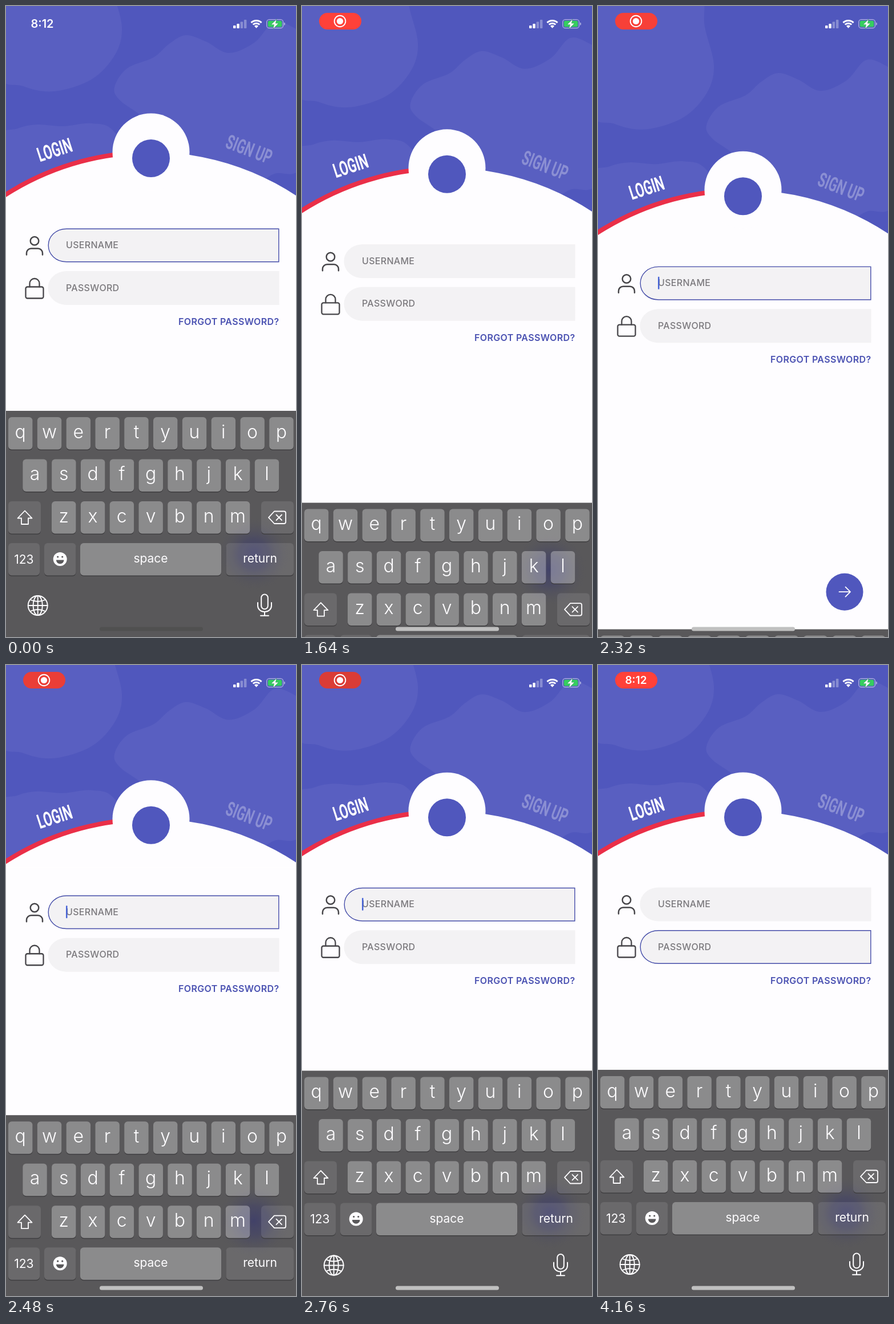
Write an HTML page with a canvas that moves like this. It is 508 px wide and 1102 px high and loops after 4.2 s.

```html
<!DOCTYPE html>
<html lang="en">
<head>
<meta charset="utf-8">
<title>Login screen</title>
<style>
  html, body { margin: 0; width: 100%; height: 100%; overflow: hidden; background: #fefdff; }
  canvas { display: block; width: 100vw; height: 100vh; }
</style>
</head>
<body>
<canvas id="stage"></canvas>
<script>
const W = 508, H = 1102, LOOP = 4200, TICK = 40;
const BLUE = '#5057bd', BLOB = '#595fc1', RED = '#ea2f48', WHITE = '#fefdff', INK = '#47464a';
const KEY_BG = '#59585a', KEY_SHADOW = '#3f3e40';
const FONT = 'Inter, "Open Sans", sans-serif';
const KEYBOARD = { top: 707, height: 395 };
const KEY_H = 56.5;
const CONTENT_SHIFT = 68.5;
const HIDE_AT = 1565, SHOW_AT = 2303;
const HILL = { x: 254, y: 717, r: 462 };
const STRIPE = { x: 254, y: 730.5, r: 475 };
const NARROW = 0.62;

// Moments when focus changes: field 0 is the user name, 1 the password
const FOCUS = [
  { at: -800, field: 0 },
  { at: 600, field: 1 },
  { at: HIDE_AT, field: -1 },
  { at: SHOW_AT, field: 0 },
  { at: 3500, field: 1 }
];

const canvas = document.getElementById('stage');
const ctx = canvas.getContext('2d');
const ratio = window.devicePixelRatio || 1;
canvas.width = W * ratio;
canvas.height = H * ratio;

const clamp = v => Math.max(0, Math.min(1, v));
const ramp = (t, from, to) => clamp((t - from) / (to - from));
const mix = (a, b, k) => a + (b - a) * k;

// Critically damped spring going from 0 to 1
function spring(ms, rate) {
  const x = Math.max(0, ms) / 1000 * rate;
  return 1 - (1 + x) * Math.exp(-x);
}

function hiddenAmount(t) {
  return t < SHOW_AT ? spring(t - HIDE_AT, 18.6) : 1 - spring(t - SHOW_AT, 16.9);
}

function box(x, y, w, h, r, fill) {
  ctx.beginPath();
  ctx.roundRect(x, y, w, h, r);
  ctx.fillStyle = fill;
  ctx.fill();
}

function disc(x, y, r, fill) {
  ctx.beginPath();
  ctx.arc(x, y, r, 0, Math.PI * 2);
  ctx.fillStyle = fill;
  ctx.fill();
}

function ring(x, y, r, color, width) {
  ctx.beginPath();
  ctx.arc(x, y, r, 0, Math.PI * 2);
  ctx.strokeStyle = color;
  ctx.lineWidth = width;
  ctx.stroke();
}

function line(d, color, width) {
  ctx.strokeStyle = color;
  ctx.lineWidth = width;
  ctx.lineCap = ctx.lineJoin = 'round';
  ctx.stroke(new Path2D(d));
}

function text(str, x, y, size, weight, color, align = 'center', spacing = 0) {
  ctx.font = `${weight} ${size}px ${FONT}`;
  ctx.letterSpacing = spacing + 'px';
  ctx.textAlign = align;
  ctx.textBaseline = 'alphabetic';
  ctx.fillStyle = color;
  ctx.fillText(str, x, y);
  ctx.letterSpacing = '0px';
}

// Closed smooth outline through the given points
function blob(points) {
  const n = points.length;
  const at = i => points[(i + n) % n];
  ctx.beginPath();
  ctx.moveTo(...points[0]);
  for (let i = 0; i < n; i++) {
    const [a, b, c, d] = [at(i - 1), at(i), at(i + 1), at(i + 2)];
    ctx.bezierCurveTo(
      b[0] + (c[0] - a[0]) / 6, b[1] + (c[1] - a[1]) / 6,
      c[0] - (d[0] - b[0]) / 6, c[1] - (d[1] - b[1]) / 6, c[0], c[1]);
  }
  ctx.fillStyle = BLOB;
  ctx.fill();
}

function tab(label, x, y, degrees, color) {
  ctx.save();
  ctx.translate(x, y);
  ctx.rotate(degrees * Math.PI / 180);
  ctx.scale(NARROW, 1);
  ctx.font = '700 35px Roboto, sans-serif';
  ctx.textAlign = 'center';
  ctx.textBaseline = 'alphabetic';
  ctx.fillStyle = color;
  ctx.fillText(label, 0, 12.5);
  ctx.restore();
}

function drawHeader() {
  ctx.fillStyle = BLUE;
  ctx.fillRect(0, -90, W, 430);
  blob([[-60, -90], [80, -140], [176, -100], [187, -30], [203, 37], [191, 85], [150, 128],
    [85, 149], [30, 140], [-20, 110]]);
  blob([[540, 60], [508, 40], [470, 28], [435, 64], [390, 82], [350, 62], [315, 51], [286, 66],
    [258, 90], [212, 109], [190, 142], [200, 165], [240, 194], [300, 250], [380, 330],
    [430, 318], [470, 293], [515, 286], [560, 200]]);
  blob([[-20, 235], [20, 214], [55, 207], [100, 210], [150, 205], [190, 220], [230, 300], [100, 380], [-40, 360]]);

  disc(HILL.x, HILL.y, HILL.r, WHITE);
  ctx.beginPath();
  ctx.arc(STRIPE.x, STRIPE.y, STRIPE.r, Math.PI * 1.16, Math.PI * 1.5);
  ctx.strokeStyle = RED;
  ctx.lineWidth = 8;
  ctx.lineCap = 'butt';
  ctx.stroke();

  disc(254, 255, 67.5, WHITE);
  disc(254, 266, 33, BLUE);
  tab('LOGIN', 85, 251, -18, WHITE);
  tab('SIGN UP', 426, 250, 21, '#8b8fd3');
}

function drawField(label, y, focused, caret) {
  const inset = focused ? 0.7 : 0;
  ctx.beginPath();
  ctx.moveTo(478.5 - inset, y + inset);
  ctx.lineTo(106, y + inset);
  ctx.bezierCurveTo(87, y + inset, 73.5 + inset, y + 14, 73.5 + inset, y + 29.5);
  ctx.bezierCurveTo(73.5 + inset, y + 45, 87, y + 59 - inset, 106, y + 59 - inset);
  ctx.lineTo(478.5 - inset, y + 59 - inset);
  ctx.closePath();
  ctx.fillStyle = '#f3f2f4';
  ctx.fill();
  if (focused) {
    ctx.strokeStyle = '#454da9';
    ctx.lineWidth = 1.4;
    ctx.lineJoin = 'miter';
    ctx.stroke();
  }
  text(label, 105, y + 34.5, 16, 500, '#7b797d', 'left', 0.3);
  if (caret) box(105, y + 18, 2.5, 22, 1, '#4a66d8');
}

function drawForm(t) {
  const focus = FOCUS.filter(f => f.at <= t).pop();
  const caretOn = (t - focus.at) % 1050 < 550;
  ['USERNAME', 'PASSWORD'].forEach((label, i) => {
    const focused = focus.field === i;
    drawField(label, 388.5 + i * 74.5, focused, focused && caretOn);
  });

  ring(50, 410.3, 7.3, INK, 2.5);
  line('M36 434.5v-3a8 8 0 0 1 8-8h12a8 8 0 0 1 8 8v3', INK, 2.5);
  line('M37.5 490.5h25a3 3 0 0 1 3 3v14a3 3 0 0 1-3 3h-25a3 3 0 0 1-3-3v-14a3 3 0 0 1 3-3z', INK, 2.3);
  line('M41.5 490.5v-6a8.5 8.5 0 0 1 17 0v6', INK, 2.3);

  text('FORGOT PASSWORD?', 478.5, 557, 16, 600, '#4b52b2', 'right', 0.35);

  disc(432, 957, 32.5, BLUE);
  line('M422.5 957h19M433.5 948.5l8.5 8.5l-8.5 8.5', WHITE, 1.8);
}

function key(x, y, w, special) {
  // The shadow only shows outside the translucent key
  ctx.save();
  ctx.beginPath();
  ctx.rect(x - 2, y - 2, w + 4, KEY_H + 6);
  ctx.roundRect(x, y, w, KEY_H, 6);
  ctx.clip('evenodd');
  box(x, y + 1.5, w, KEY_H, 6, KEY_SHADOW);
  ctx.restore();
  box(x, y, w, KEY_H, 6, `rgba(255,255,255,${special ? 0.1 : 0.3})`);
}

function letters(row, x, y) {
  [...row].forEach((ch, i) => {
    const left = x + i * 50.8;
    key(left, y, 42.5);
    text(ch, left + 21.2, y + 36.5, 32, 300, WHITE);
  });
}

function drawKeyboard(glowY) {
  ctx.fillStyle = KEY_BG;
  ctx.fillRect(0, KEYBOARD.top, W, KEYBOARD.height + 10);

  const glow = ctx.createRadialGradient(434, glowY, 0, 434, glowY, 66);
  glow.addColorStop(0, 'rgba(60,60,108,.8)');
  glow.addColorStop(0.4, 'rgba(64,64,104,.55)');
  glow.addColorStop(1, 'rgba(89,88,90,0)');
  ctx.fillStyle = glow;
  ctx.fillRect(360, KEYBOARD.top, 148, KEYBOARD.height);

  letters('qwertyuiop', 4, 718);
  letters('asdfghjkl', 29.3, 791.5);
  letters('zxcvbnm', 80, 865);
  key(4, 865, 57, true);
  key(447, 865, 57, true);
  key(4, 938, 55, true);
  key(67, 938, 55.5, true);
  key(130, 938, 247);
  key(385.5, 938, 118.5, true);

  line('M33 881.5l12.5 13h-6.5v10.5h-12v-10.5h-6.5z', WHITE, 1.8);
  line('M470 882.5h17a3 3 0 0 1 3 3v15.5a3 3 0 0 1-3 3h-17l-10-10.7z', WHITE, 1.8);
  line('M473.5 888.5l9.5 9.5M483 888.5l-9.5 9.5', WHITE, 1.8);

  text('123', 31.3, 973.5, 21, 400, WHITE);
  text('space', 253.5, 972, 21, 400, WHITE);
  text('return', 445, 972, 21, 400, WHITE);

  disc(94.7, 966, 12, WHITE);
  disc(90.7, 962, 1.6, KEY_BG);
  disc(98.7, 962, 1.6, KEY_BG);
  ctx.beginPath();
  ctx.arc(94.7, 967.5, 6.8, 0, Math.PI);
  ctx.fill();

  drawGlobe(55.7, 1047, 17);
  line('M453 1027.5a5.8 5.8 0 0 1 5.8 5.8v14.2a5.8 5.8 0 0 1-11.6 0v-14.2a5.8 5.8 0 0 1 5.8-5.8z', WHITE, 2);
  line('M441 1042v5.5a12 10.5 0 0 0 24 0v-5.5M453 1058v6.5M446 1064.8h14', WHITE, 2);
}

function drawGlobe(x, y, r) {
  ring(x, y, r, WHITE, 1.9);
  ctx.beginPath();
  ctx.ellipse(x, y, r * 0.48, r, 0, 0, Math.PI * 2);
  ctx.stroke();
  line(`M${x - r} ${y}h${2 * r}M${x} ${y - r}v${2 * r}`, WHITE, 1.9);
  line(`M${x - 13} ${y - 10}q13 6 26 0M${x - 13} ${y + 10}q13 -6 26 0`, WHITE, 1.9);
}

function drawStatus(t) {
  const pill = ramp(t, 0, 240);
  const toTime = ramp(t, 3440, 3640);
  ctx.globalAlpha = 1 - pill;
  text('8:12', 63.5, 38, 20, 600, WHITE);

  const pulse = clamp(0.6 + 0.7 * Math.cos((t - 1900) / 1000 * Math.PI));
  ctx.globalAlpha = pill;
  box(30, 12, 74, 29, 14.5,
    `rgb(${mix(218, 255, pulse)},${mix(60, 65, pulse)},${mix(54, 57, pulse)})`);

  ctx.globalAlpha = pill * (1 - toTime);
  ring(66.5, 26.5, 9.8, WHITE, 1.9);
  disc(66.5, 26.5, 5.6, WHITE);
  ctx.globalAlpha = pill * toTime;
  text('8:12', 66.5, 33.2, 19, 600, WHITE);
  ctx.globalAlpha = 1;

  [5, 8, 11.5, 15].forEach((h, i) =>
    box(398 + i * 6.3, 39 - h, 4.5, h, 1, i < 2 ? WHITE : 'rgba(255,255,255,.32)'));

  // Wi-Fi fan
  const fan = Math.PI * 0.245;
  ctx.lineCap = 'butt';
  ctx.strokeStyle = WHITE;
  ctx.lineWidth = 3;
  for (const r of [8.3, 13]) {
    ctx.beginPath();
    ctx.arc(438.5, 38.5, r, -Math.PI / 2 - fan, -Math.PI / 2 + fan);
    ctx.stroke();
  }
  ctx.beginPath();
  ctx.moveTo(438.5, 38.8);
  ctx.arc(438.5, 38.5, 5, -Math.PI / 2 - fan, -Math.PI / 2 + fan);
  ctx.fillStyle = WHITE;
  ctx.fill();

  // Charging battery
  ctx.beginPath();
  ctx.roundRect(456.7, 23.7, 28.8, 15, 4.5);
  ctx.strokeStyle = 'rgba(255,255,255,.55)';
  ctx.lineWidth = 1.3;
  ctx.stroke();
  box(458.8, 25.8, 24.5, 10.8, 2.6, '#35cf5e');
  box(487, 28.7, 1.8, 5, [0, 2, 2, 0], 'rgba(255,255,255,.55)');
  const bolt = new Path2D('M473.5 24l-8.5 8.2h5l-1.7 6.8l8.5-8.6h-5z');
  ctx.strokeStyle = '#45a06f';
  ctx.lineWidth = 1.2;
  ctx.stroke(bolt);
  ctx.fillStyle = WHITE;
  ctx.fill(bolt);
}

// The bar brightens slowly from almost hidden to light grey
function drawHomeBar(t) {
  const v = Math.round(mix(80, 192, ramp(t, 0, 1640)));
  box(164, 1084.5, 181, 7, 3.5, `rgb(${v},${v},${v})`);
}

function draw(t) {
  const hidden = hiddenAmount(t);
  const shift = hidden * CONTENT_SHIFT;
  const drop = hidden * KEYBOARD.height;

  ctx.setTransform(canvas.width / W, 0, 0, canvas.height / H, 0, 0);
  ctx.fillStyle = WHITE;
  ctx.fillRect(0, 0, W, H);

  ctx.save();
  ctx.translate(0, shift);
  drawHeader();
  // The page below the curve stays plain
  ctx.fillStyle = WHITE;
  ctx.fillRect(0, 340, W, H);
  drawForm(t);
  ctx.restore();

  ctx.save();
  ctx.translate(0, drop);
  drawKeyboard(957 + shift - drop);
  ctx.restore();

  drawHomeBar(t);
  drawStatus(t);
}

const start = performance.now();
function frame() {
  const t = (performance.now() - start) % LOOP;
  draw(Math.floor(t / TICK) * TICK);
  requestAnimationFrame(frame);
}
frame();
</script>
</body>
</html>
```
